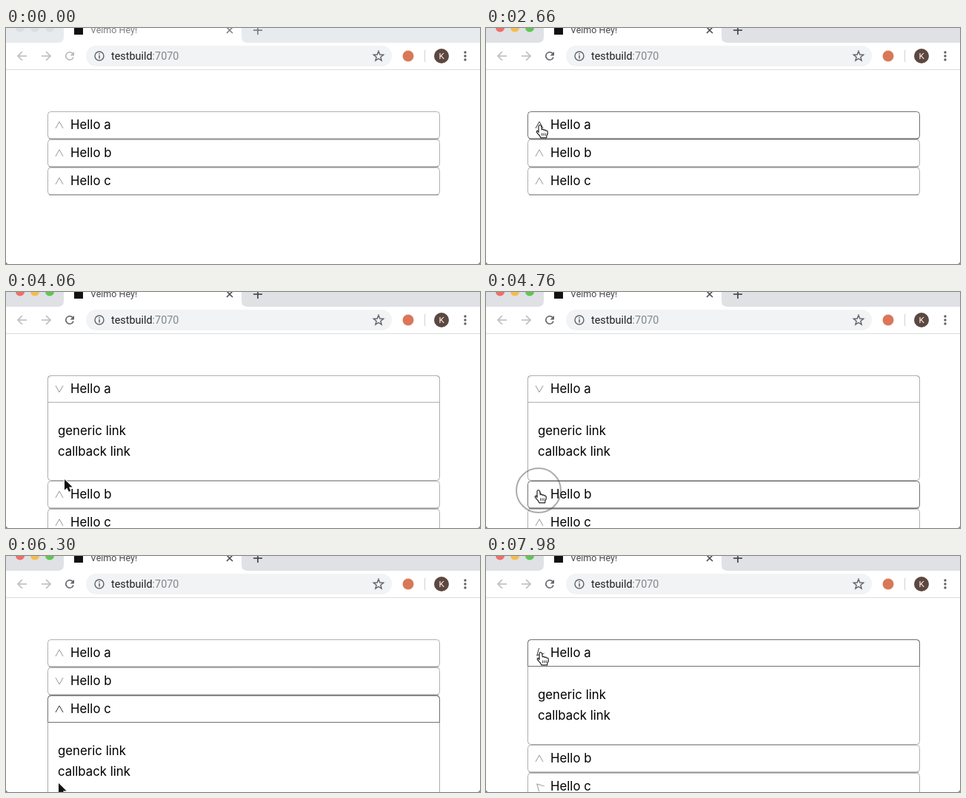
These frames come from a looping animation (640 by 320 pixels, 8000 ms). An HTML page with a canvas:

```html
<!DOCTYPE html>
<html lang="en">
<head>
<meta charset="utf-8">
<title>Accordion demo</title>
<style>
  html, body { margin: 0; width: 640px; height: 320px; overflow: hidden; background: #fff; }
  canvas { display: block; }
</style>
</head>
<body>
<canvas id="stage" width="640" height="320"></canvas>
<script>
const ctx = document.getElementById('stage').getContext('2d');
const LOOP = 8000, STEP = 70, SPIN = 300, FOCUS = 910;
const LEFT = 56, RIGHT = 586, TOP = 113, ROW = 38, BODY = 105;
const LABELS = ['Hello a', 'Hello b', 'Hello c'];

// Pointer stops: time, x, y
const PATH = [
  [0, 366, 332], [490, 366, 332], [700, 366, 273], [1330, 366, 273],
  [1470, 259, 208], [1960, 150, 133], [2310, 150, 133], [2660, 73, 132],
  [3430, 73, 132], [4060, 79, 254], [4270, 71, 269], [5040, 71, 269],
  [5110, 70, 268], [5390, 70, 268], [6020, 71, 308], [6440, 71, 308],
  [6930, 90, 222], [7560, 74, 131], [8000, 74, 131]
];
const PRESSES = [[910, 1120], [2870, 3080], [4690, 4900], [6090, 6300], [7700, 7840]];
// Which row opens at which time
const OPENINGS = [[3080, 0], [4900, 1], [6300, 2], [7840, 0]];

const clamp = v => Math.max(0, Math.min(1, v));
const mix = (a, b, k) => a + (b - a) * k;
const grey = v => `rgb(${v},${v},${v})`;

function openRow(t) {
  let row = -1;
  for (const [at, r] of OPENINGS) if (t >= at) row = r;
  return row;
}

function openness(row, t) {
  let from = 0, before = -1;
  for (const [at, r] of OPENINGS) {
    if (t < at) break;
    const k = 1 - Math.pow(1 - clamp((t - at) / SPIN), 2.2);
    if (r === row) from = k;
    else if (before === row) from = 1 - k;
    before = r;
  }
  return from;
}

function rowTop(row, open) {
  return TOP + row * ROW + (open >= 0 && row > open ? BODY : 0);
}

function pointer(t) {
  let i = 0;
  while (i < PATH.length - 2 && t >= PATH[i + 1][0]) i++;
  const [t0, x0, y0] = PATH[i], [t1, x1, y1] = PATH[i + 1];
  const k = clamp((t - t0) / (t1 - t0));
  const still = x0 === x1 && y0 === y1;
  return { x: mix(x0, x1, k), y: mix(y0, y1, k), moved: still ? t0 : t };
}

function rowAt(p, open) {
  if (p.x < LEFT || p.x > RIGHT) return -1;
  return LABELS.findIndex((_, i) => {
    const y = rowTop(i, open);
    return p.y >= y && p.y < y + ROW;
  });
}

// Hover is only re-evaluated when the pointer moves.
function hoverRow(t) {
  const p = pointer(Math.max(0, t));
  return rowAt(p, openRow(p.moved));
}

function hoverLevel(row, t) {
  let n = 0;
  for (let k = 1; k <= 4; k++) if (hoverRow(t - k * STEP) === row) n++;
  return n / 4;
}

function text(str, x, y, font, color) {
  ctx.font = font;
  ctx.fillStyle = color;
  ctx.fillText(str, x, y);
  return ctx.measureText(str).width;
}

function line(points, color, width = 1) {
  ctx.beginPath();
  points.forEach(([x, y], i) => i ? ctx.lineTo(x, y) : ctx.moveTo(x, y));
  ctx.strokeStyle = color;
  ctx.lineWidth = width;
  ctx.stroke();
}

function disc(x, y, r, color) {
  ctx.beginPath();
  ctx.arc(x, y, r, 0, Math.PI * 2);
  ctx.fillStyle = color;
  ctx.fill();
}

function ring(x, y, r, color, width, from = 0, to = Math.PI * 2) {
  ctx.beginPath();
  ctx.arc(x, y, r, from, to);
  ctx.strokeStyle = color;
  ctx.lineWidth = width;
  ctx.stroke();
}

function box(x, y, w, h, r) {
  ctx.beginPath();
  ctx.roundRect(x, y, w, h, r);
}

function drawTabs(active) {
  ctx.fillStyle = active ? '#dfe1e5' : '#e8ebee';
  ctx.fillRect(0, 0, 640, 20);
  const lights = active ? ['#ed706a', '#f4bf4f', '#61c554'] : Array(3).fill('#dcdee0');
  lights.forEach((c, i) => disc(19 + i * 20, -0.5, 6, c));

  ctx.fillStyle = '#fff';
  ctx.beginPath();
  ctx.moveTo(70, 20);
  ctx.quadraticCurveTo(78, 20, 78, 12);
  ctx.lineTo(78, 0);
  ctx.lineTo(318, 0);
  ctx.lineTo(318, 12);
  ctx.quadraticCurveTo(318, 20, 326, 20);
  ctx.fill();

  const ink = active ? '#45494d' : '#7b7e81';
  ctx.fillStyle = '#111';
  ctx.fillRect(92, -3, 12, 12);
  text('Velmo Hey!', 114, 7, '12.5px Roboto, sans-serif', ink);
  line([[298, -1], [306, 7]], ink, 1.5);
  line([[306, -1], [298, 7]], ink, 1.5);
  line([[334, 3], [346, 3]], ink, 1.7);
  line([[340, 0], [340, 9]], ink, 1.7);
}

function drawNavArrow(x, dir) {
  const c = '#babcbe';
  line([[x - 6 * dir, 38], [x + 6 * dir, 38]], c, 1.6);
  line([[x, 32], [x + 6 * dir, 38], [x, 44]], c, 1.6);
}

function drawStar(x, y) {
  ctx.beginPath();
  for (let i = 0; i < 10; i++) {
    const a = -Math.PI / 2 + i * Math.PI / 5, r = i % 2 ? 3 : 7;
    ctx.lineTo(x + r * Math.cos(a), y + r * Math.sin(a));
  }
  ctx.closePath();
  ctx.strokeStyle = '#5f6368';
  ctx.lineWidth = 1.4;
  ctx.stroke();
}

function drawToolbar(active) {
  const ink = '#5f6368', reload = active ? ink : '#b6b8bb';
  drawNavArrow(22, -1);
  drawNavArrow(54, 1);

  ring(86, 38, 5.2, reload, 1.6, 0.3, 5.5);
  ctx.fillStyle = reload;
  ctx.beginPath();
  ctx.moveTo(92, 32);
  ctx.lineTo(92, 37.5);
  ctx.lineTo(86.5, 37.5);
  ctx.fill();

  box(108, 24, 413, 28, 14);
  ctx.fillStyle = '#f1f3f4';
  ctx.fill();
  ring(126, 38, 6, ink, 1.4);
  ctx.fillStyle = ink;
  ctx.fillRect(125.3, 37, 1.5, 4.5);
  ctx.fillRect(125.3, 34.3, 1.5, 1.5);
  const font = '14.4px Roboto, sans-serif';
  const w = text('testbuild', 142, 43, font, '#202124');
  text(':7070', 142 + w, 43, font, '#80868b');

  drawStar(503, 38.5);
  disc(543, 38, 7.5, '#d97858');
  line([[565.5, 30], [565.5, 46]], '#d0d3d6');
  disc(588, 38, 10, '#5d4840');
  ctx.textAlign = 'center';
  text('K', 588, 42, '11.5px Roboto, sans-serif', '#fff');
  ctx.textAlign = 'left';
  for (const y of [33, 38, 43]) disc(620, y, 1.7, ink);
  line([[0, 56.5], [640, 56.5]], '#dadce0');
}

function drawCaret(y, level, color) {
  ctx.save();
  ctx.translate(72, y + 18.5);
  ctx.rotate(-Math.PI * level);
  line([[-5, 4.5], [0, -4.5], [5, 4.5]], color);
  ctx.restore();
}

function drawRow(row, t) {
  const open = openRow(t), y = rowTop(row, open), isOpen = open === row;
  const hover = hoverLevel(row, t);
  const border = grey(Math.round(mix(176, 112, hover)));
  const font = '16.8px Inter, sans-serif';

  box(LEFT + 0.5, y + 0.5, RIGHT - LEFT - 1, isOpen ? ROW + BODY - 1 : ROW - 1.5, 4);
  ctx.strokeStyle = isOpen ? '#aaa' : border;
  ctx.lineWidth = 1;
  ctx.stroke();
  if (isOpen) {
    box(LEFT + 0.5, y + 0.5, RIGHT - LEFT - 1, ROW - 2, [4, 4, 0, 0]);
    ctx.strokeStyle = border;
    ctx.stroke();
    text('generic link', 70, y + 81, font, '#000');
    text('callback link', 70, y + 109, font, '#000');
  } else {
    line([[LEFT + 2, y + 37.3], [RIGHT - 2, y + 37.3]], grey(Math.round(mix(140, 105, hover))));
  }
  drawCaret(y, openness(row, t), grey(Math.round(mix(150, 50, hover))));
  text(LABELS[row], 87, y + 24, font, '#000');
}

const ARROW = new Path2D('M0 0V14.5L3.4 11.4L5.8 16.8L8.3 15.7L6 10.4H10.6Z');
const HAND = new Path2D('M-2 9.5V1.3Q-1.7-.5-.2-.5Q1.4-.4 1.7 1.4L2.3 5.8Q4.2 4.8 5 6.4' +
  'Q7 5.6 7.7 7.2Q9.8 6.8 10.3 8.8Q10.6 11.5 9 14L8.6 16.8H.8L-.6 14Q-2.5 12-4.6 9.3' +
  'Q-5 7.2-3.3 7.5Z');

function drawPointer(t) {
  const p = pointer(t);
  if (PRESSES.some(([a, b]) => t >= a && t < b)) {
    ring(p.x, p.y, 30, 'rgba(90,90,90,.5)', 2);
  }
  ctx.save();
  ctx.translate(p.x, p.y);
  ctx.lineJoin = 'round';
  if (rowAt(p, openRow(t)) >= 0) {
    ctx.fillStyle = '#fff';
    ctx.fill(HAND);
    ctx.strokeStyle = '#222';
    ctx.lineWidth = 1.2;
    ctx.stroke(HAND);
    for (const x of [2.6, 4.9, 7.2]) line([[x, 10.5], [x, 14]], '#222', 0.9);
  } else {
    ctx.strokeStyle = '#fff';
    ctx.lineWidth = 2;
    ctx.stroke(ARROW);
    ctx.fillStyle = '#111';
    ctx.fill(ARROW);
  }
  ctx.restore();
}

function drawCorners() {
  ctx.fillStyle = '#777';
  for (const [x, d] of [[0, 1], [640, -1]]) {
    ctx.beginPath();
    ctx.moveTo(x, 316);
    ctx.quadraticCurveTo(x, 320, x + 4 * d, 320);
    ctx.lineTo(x, 320);
    ctx.fill();
  }
}

function frame(now) {
  const t = Math.floor((now % LOOP) / STEP) * STEP;
  ctx.fillStyle = '#fff';
  ctx.fillRect(0, 0, 640, 320);
  drawTabs(t >= FOCUS);
  drawToolbar(t >= FOCUS);
  LABELS.forEach((_, row) => drawRow(row, t));
  drawPointer(t);
  drawCorners();
  requestAnimationFrame(frame);
}
requestAnimationFrame(frame);
</script>
</body>
</html>
```
